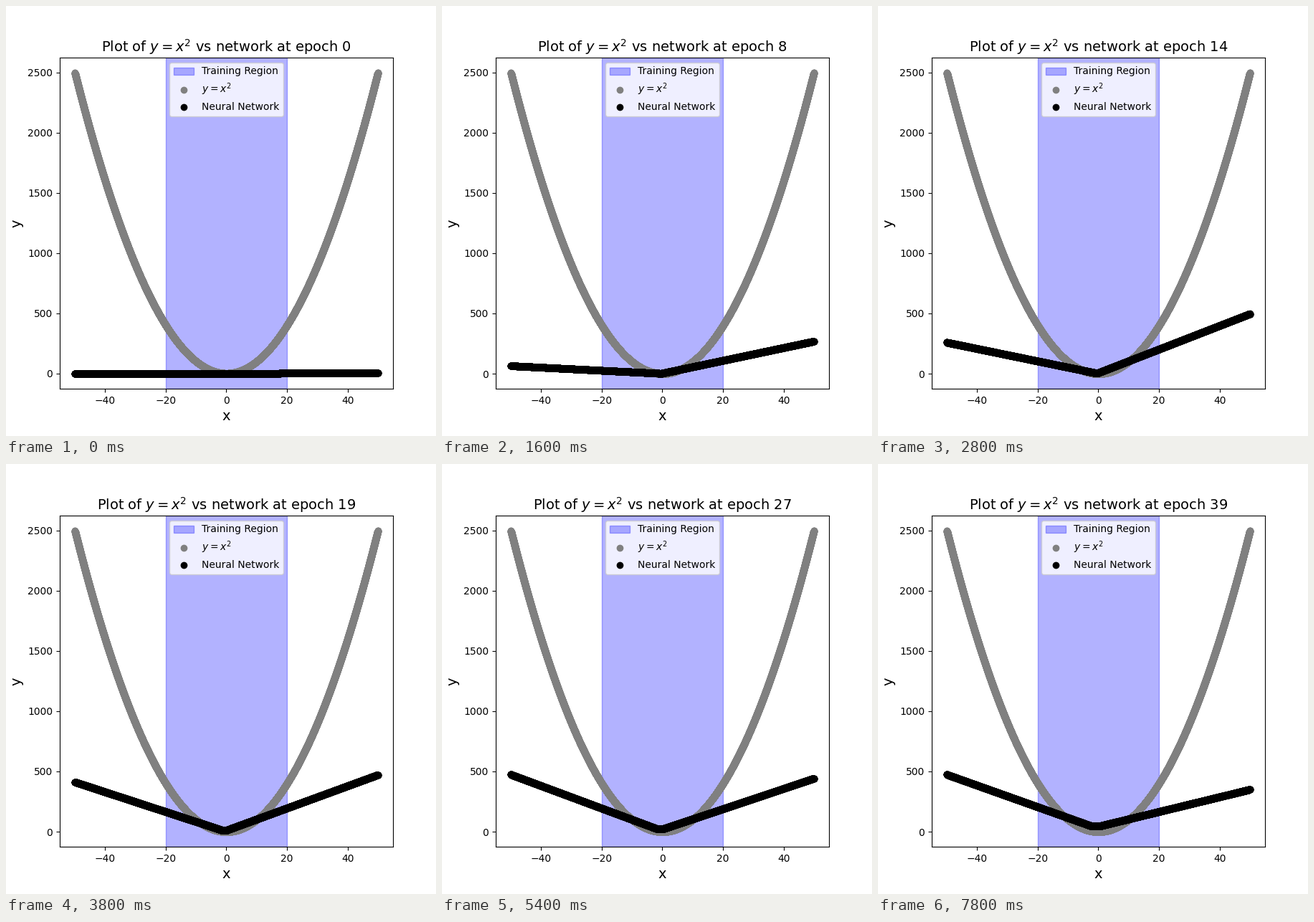
Recreate the animation shown at these times as a matplotlib script. Size 600 px wide and 600 px high, loop 8 s.

```python
import numpy as np
import matplotlib.pyplot as plt
from matplotlib.animation import FuncAnimation

EPOCHS = 40
INTERVAL = 200

# samples fall just short of +-50
x = np.linspace(-49.98, 49.99, 10001)


def sigmoid(z):
    return 1 / (1 + np.exp(-z))


def ramp(t, middle, rate):
    """S-curve in time, 0 at t = 0 and close to 1 at the end."""
    start = sigmoid(-rate * middle)
    return (sigmoid(rate * (t - middle)) - start) / (1 - start)


def network(t):
    """Two arms around a flat base that rises and widens with training."""
    left = (498 - 0.55 * t) * ramp(t, 13.5, 0.318)
    right = (474 - 0.203 * (t - 14.1) ** 2) * ramp(t, 7.4, 0.53)
    right += 35 * np.exp(-((t - 14) / 3) ** 2)  # brief overshoot
    base = 0.055 * t ** 1.85
    bends = [-50, -0.5 - 0.05 * t, -0.5 + 0.03 * t, 50]
    return 0.044 * x + np.interp(x, bends, [left, base, base, right])


fig, ax = plt.subplots(figsize=(6, 6), dpi=100)
ax.axvspan(-20, 20, color="blue", alpha=0.3, label="Training Region")
ax.scatter(x, x ** 2, color="gray", label="$y=x^2$")
dots = ax.scatter(x, network(0), color="black", label="Neural Network")
ax.set_xlabel("x", fontsize=14)
ax.set_ylabel("y", fontsize=14)
ax.legend(loc="upper center")
title = ax.set_title("", fontsize=14)


def padded(low, high):
    pad = 0.05 * (high - low)
    return low - pad, high + pad


ax.set_xlim(padded(x.min(), x.max()))


def update(epoch):
    y = network(epoch)
    dots.set_offsets(np.column_stack([x, y]))
    ax.set_ylim(padded(min((x ** 2).min(), y.min()), (x ** 2).max()))
    title.set_text(f"Plot of $y=x^2$ vs network at epoch {epoch}")
    return dots, title


anim = FuncAnimation(fig, update, frames=EPOCHS, interval=INTERVAL,
                     repeat=True, repeat_delay=0, blit=False)
plt.show()
```
